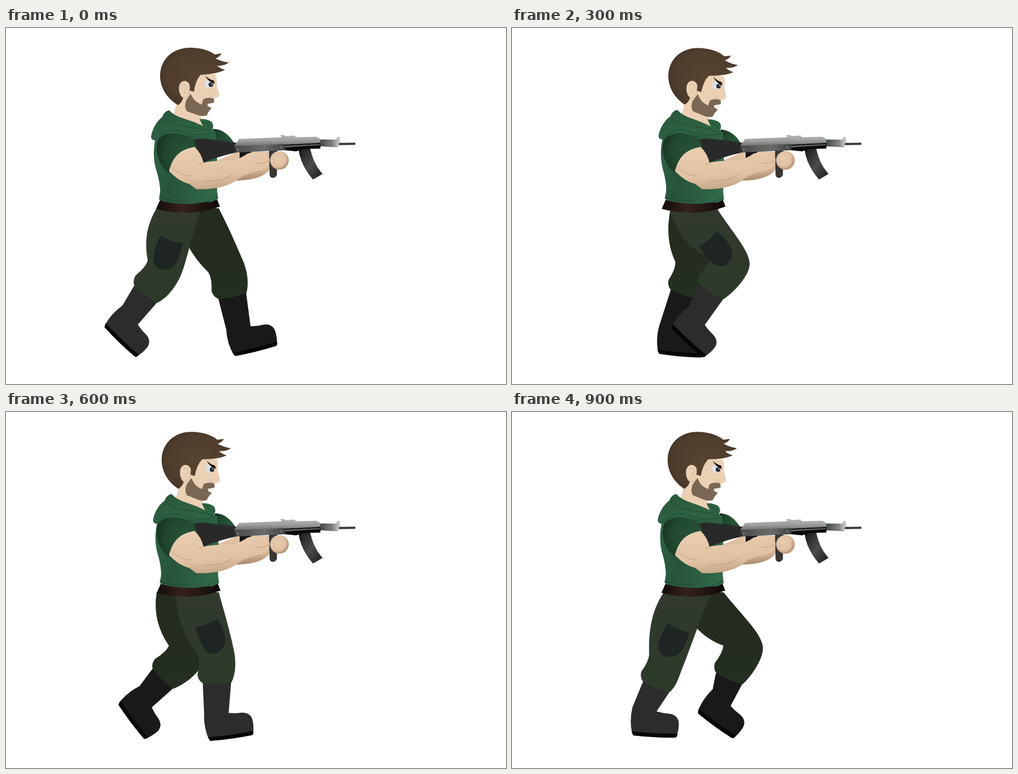
Write an HTML page that moves like this. It is 886 px wide and 632 px high and loops after 1 s.

```html
<!DOCTYPE html>
<html lang="en">
<head>
<meta charset="utf-8">
<title>Walk cycle</title>
<style>
html, body { margin: 0; height: 100%; overflow: hidden; background: #fff; }
svg { display: block; width: 886px; height: 632px; }
.line { fill: none; stroke-width: .8; }
</style>
</head>
<body>
<svg viewBox="0 0 886 632">
  <defs>
    <linearGradient id="pants" gradientUnits="userSpaceOnUse" x1="0" y1="325" x2="0" y2="490">
      <stop offset="0" stop-color="#313a2d"/><stop offset=".6" stop-color="#2f3a2b"/><stop offset="1" stop-color="#2b3b28"/>
    </linearGradient>
    <linearGradient id="farPants" gradientUnits="userSpaceOnUse" x1="0" y1="325" x2="0" y2="490">
      <stop offset="0" stop-color="#232c1f"/><stop offset=".6" stop-color="#242d20"/><stop offset="1" stop-color="#233020"/>
    </linearGradient>
    <linearGradient id="shirt" x1="0" y1=".2" x2="1" y2=".5">
      <stop offset="0" stop-color="#2f6444"/><stop offset=".4" stop-color="#27533a"/><stop offset="1" stop-color="#316848"/>
    </linearGradient>
    <linearGradient id="hood" x1="0" y1="0" x2="1" y2="1">
      <stop offset="0" stop-color="#295439"/><stop offset=".5" stop-color="#2d6041"/><stop offset="1" stop-color="#2e6644"/>
    </linearGradient>
    <radialGradient id="sleeve" cx=".75" cy=".5" r=".8">
      <stop offset="0" stop-color="#275438"/><stop offset=".65" stop-color="#20472f"/><stop offset="1" stop-color="#173222"/>
    </radialGradient>
    <linearGradient id="belt" x1="0" y1="0" x2="1" y2="0">
      <stop offset="0" stop-color="#130b0a"/><stop offset=".4" stop-color="#35221e"/><stop offset="1" stop-color="#0f0908"/>
    </linearGradient>
    <radialGradient id="hair" cx=".55" cy=".5" r=".6">
      <stop offset="0" stop-color="#56432f"/><stop offset=".7" stop-color="#503e2e"/><stop offset="1" stop-color="#453526"/>
    </radialGradient>
    <linearGradient id="arm" x1=".2" y1="0" x2=".45" y2="1">
      <stop offset="0" stop-color="#ebceb2"/><stop offset=".7" stop-color="#e0c1a3"/><stop offset="1" stop-color="#c6a687"/>
    </linearGradient>
    <linearGradient id="farArm" x1="0" y1="0" x2="0" y2="1">
      <stop offset="0" stop-color="#e2c5a9"/><stop offset=".6" stop-color="#d8b798"/><stop offset="1" stop-color="#a98a6c"/>
    </linearGradient>
    <radialGradient id="fist" cx=".4" cy=".4" r=".6">
      <stop offset="0" stop-color="#e8ccb0"/><stop offset=".7" stop-color="#dfc0a2"/><stop offset="1" stop-color="#b39475"/>
    </radialGradient>
    <linearGradient id="steel" x1="0" y1="0" x2=".05" y2="1">
      <stop offset="0" stop-color="#b3b3b3"/><stop offset=".5" stop-color="#a0a0a0"/><stop offset="1" stop-color="#707070"/>
    </linearGradient>
    <linearGradient id="guard" x1="0" y1="0" x2="1" y2="0">
      <stop offset="0" stop-color="#4a4a4a"/><stop offset=".6" stop-color="#6a6c6a"/><stop offset="1" stop-color="#3f403f"/>
    </linearGradient>
    <linearGradient id="barrel" x1="0" y1="0" x2="1" y2="0">
      <stop offset="0" stop-color="#434943"/><stop offset=".6" stop-color="#7d827d"/><stop offset="1" stop-color="#d0d2d0"/>
    </linearGradient>
    <linearGradient id="mag" x1="0" y1="0" x2="1" y2=".9">
      <stop offset="0" stop-color="#181818"/><stop offset=".55" stop-color="#4b4b4b"/><stop offset="1" stop-color="#1e1e1e"/>
    </linearGradient>
  </defs>

  <!-- far arm -->
  <path fill="url(#farArm)" d="M370 237L414 218L470 220L468 250Q455 270 408 271Z"/>

  <g id="far"></g>
  <g id="near"></g>

  <path id="waist" fill="url(#belt)" d="M273 305Q322 318 374 304L379 317Q350 328 322 328Q290 328 266 321Z"/>

  <g id="torso">
    <path fill="url(#sleeve)" d="M366 179Q389 179 404 204L372 210Z"/>
    <path fill="#ecd0b4" d="M303 130L297 153L320 172L350 175L343 150Z"/>
    <path fill="url(#shirt)" d="M266 190C259 220 262 240 268 258Q274 280 273 292L271 304Q276 308 284 309Q305 313 335 312Q352 308 364 309L376 303L374 288L375 250L371 184L340 170L290 165Z"/>
    <path fill="url(#hood)" d="M289 146Q280 148 277 158C266 166 258 182 257 194Q259 201 267 199Q280 186 300 187Q340 196 369 185Q363 180 367 177Q368 168 362 165Q352 160 343 162L349 174Q333 166 316 161Q298 156 289 146Z"/>
    <path class="line" stroke="#1b422b" d="M278 159Q290 172 318 175Q345 178 364 183M264 199Q284 176 306 183Q340 194 368 186M350 167Q360 170 364 179M273 301Q290 308 320 307M356 307L374 300"/>
  </g>

  <g id="head">
    <path fill="#ecd0b4" d="M304 100L335 80L371 81Q375 93 373 99L378 117Q379 122 369 124L368 132L362 145L340 154L304 134Z"/>
    <path fill="#7a6753" d="M327 116L330 121Q334 130 347 135L349 126Q356 121 368 124L369 131L357 134L358 138L364 141Q358 148 356 154Q347 157 338 153L321 147Q315 141 319 128Z"/>
    <path fill="#faf5f0" d="M357 134L368 132L364 140L358 138Z"/>
    <path fill="url(#hair)" d="M305 136C285 124 273 105 273 83C274 53 297 34 326 34C347 34 361 39 370 46L382 44Q378 51 371 53Q383 59 395 60Q386 67 374 66Q379 71 388 73Q374 81 345 82Q336 91 333 112L325 110Q328 97 318 93Q306 94 307 108Q308 120 314 123Q312 131 305 136Z"/>
    <path fill="#ecd0b4" stroke="#c8ab8d" stroke-width=".7" d="M325 99Q320 91 312 94Q305 99 307 111Q310 124 318 123Q325 119 325 111Z"/>
    <path class="line" stroke="#c9a98b" d="M312 100Q321 96 321 107Q315 108 317 115M363 115L361 121L366 122"/>
    <ellipse cx="358.500" cy="98.500" rx="6.500" ry="7" fill="#dce1e7"/>
    <circle cx="363" cy="99.500" r="4" fill="#272a30"/>
    <circle cx="364.500" cy="98" r="1" fill="#dce1e7"/>
    <path fill="#17120f" d="M353 84Q361 91 368 92L370 98Q359 95 353 84Z"/>
  </g>

  <g id="gun">
    <path fill="#292929" d="M333 198Q344 195 364 198L411 204L408 221Q376 228 350 239Q337 221 333 198Z"/>
    <path fill="#151515" d="M414 217L438 217L430 226Q419 227 414 231Z"/>
    <path fill="#373737" d="M466 216L481 216L480 261Q478 266 472 266Q467 265 467 259Z"/>
    <path fill="url(#mag)" d="M518 214L539 214Q545 242 561 259L544 269Q522 244 518 214Z"/>
    <path fill="#090909" d="M494 206L558 201L557 214L526 215L514 219L494 217Z"/>
    <path fill="#666" d="M494 209L556 206L556 208L494 212Z"/>
    <path fill="url(#steel)" d="M404 210L413 197L488 194L486 190L492 190L496 192L511 191L514 194L550 193L557 197V204L496 207Z"/>
    <path fill="url(#guard)" d="M404 209L495 206L495 217L408 221Z"/>
    <circle cx="411" cy="216" r="2" fill="#777"/>
    <circle cx="488" cy="212" r="2" fill="#777"/>
    <path fill="url(#barrel)" d="M557 198L585 198L587 194L592 193V205L588 212L557 210Z"/>
    <path fill="#3a3c40" d="M590 204L619 203.500V207.500L590 208Z"/>
  </g>

  <circle cx="484.500" cy="235" r="16.500" fill="url(#fist)"/>

  <!-- near arm -->
  <path fill="url(#arm)" d="M334 211C312 215 296 224 288 253Q305 272 325 277L337 286Q380 288 406 272Q422 258 455 252Q468 245 467 233Q462 223 450 220Q430 218 417 231L404 235Q370 235 350 239Q346 222 334 211Z"/>
  <path class="line" stroke="#b4926f" d="M291 246Q308 262 328 263M348 272Q385 274 404 258M350 239L342 242M443 240Q458 242 466 235"/>
  <path fill="url(#sleeve)" d="M334 211C312 215 296 224 288 257C270 242 262 217 270 198Q279 186 301 187Q324 191 334 200Z"/>
</svg>

<script>
const $ = id => document.getElementById(id);
const STEPS = 10, HIP = 322;

// Stride: phase, knee x y, ankle x y, foot angle; the leg swings first, then stands
const stride = [
  [0, 277, 432, 215, 520, 43],
  [1, 312, 437, 241, 515, 52],
  [3, 379, 425, 323, 521, 42],
  [4, 404, 427, 368, 518, 35],
  [5, 390, 427, 418, 542, -15],
  [6, 372, 431, 378, 545, -9],
  [8, 320, 425, 285, 544, 4],
  [9, 273, 441, 238, 539, 2]
];

function pose(phase) {
  const a = stride.findLast(k => k[0] <= phase), b = stride.find(k => k[0] >= phase);
  const t = a === b ? 0 : (phase - a[0]) / (b[0] - a[0]);
  return a.map((v, i) => v + (b[i] - v) * t);
}

// Rotates and moves every "x y" pair of a path
function place(path, x, y, deg) {
  const a = deg * Math.PI / 180, c = Math.cos(a), s = Math.sin(a);
  return path.replace(/(-?[\d.]+) (-?[\d.]+)/g, (_, u, v) =>
    `${(x + u * c - v * s).toFixed(1)} ${(y + u * s + v * c).toFixed(1)}`);
}

// Angle of a limb away from hanging straight down
const tilt = (x1, y1, x2, y2) => Math.atan2(x1 - x2, y2 - y1) * 180 / Math.PI;

function leg(phase, boot, cloth, patch) {
  const [, kx, ky, ax, ay, footTilt] = pose(phase);
  const hip = HIP + 20 * Math.cos((phase - 5.6) / STEPS * 2 * Math.PI);
  const left = Math.max(267, hip - 42), right = Math.min(377, hip + 42);
  const shinTilt = tilt(kx, ky, ax, ay) + 1;
  const thighTilt = 1.35 * tilt(hip, HIP, kx, ky);
  const bend = Math.max(0, shinTilt - thighTilt);

  const shin = path => place(path, kx, ky, shinTilt);
  const foot = path => place(path, ax, ay, footTilt);
  const [capX, capY] = shin(`32 ${-.4 * bend}`).split(" ").map(Number);
  const cap = path => place(path, capX, capY, (shinTilt + thighTilt) / 2);
  const draw = (fill, d) => `<path fill="${fill}" d="${d}"/>`;

  const shaft = shin("M-25 45L25 45L25 52L") +
    foot("18 -8Q30 -5 40 -5C53 -4 59 4 58 16Q58 26 55 34L-24 33Q-30 10 -25 -14L") + shin("-25 52Z");
  const sole = foot("M-25 29Q20 32 56 30Q57 38 50 37.5Q15 39 -22 36Z");
  const trouser = `M${left} 320Q${(left + kx - 30) / 2 - 16} ${368 + .25 * (kx - 300)} ` +
    shin("-32 0Q-28 12 -34 34Q-33 44 -26 49Q0 55 26 50C34 34 ") + cap("0 22 0 0C0 -24 ") +
    `${(right + capX) / 2} ${(320 + capY) / 2 - 4} ${right} 320Z`;
  const pocket = place("M-20 -25Q2 -21 22 -25C26 5 25 29 -2 31C-22 30 -23 5 -20 -25Z",
    hip + .72 * (kx - hip), HIP + .7 * (ky - HIP), thighTilt);

  return draw(boot, shaft) + draw("#060606", sole) + draw(cloth, trouser) +
    (patch ? draw("#1f2522", pocket) : "");
}

let shown = -1;
function frame(now) {
  const step = Math.floor(now / 1000 * STEPS) % STEPS;
  if (step !== shown) {
    shown = step;
    const half = step % 5 / 5;
    const sway = Math.sin(Math.PI * half) ** .8;
    const shift = `translate(${1.2 * Math.sin(2 * Math.PI * half)} 0)`;
    $("far").innerHTML = leg((step + STEPS / 2) % STEPS, "#1a1819", "url(#farPants)", false);
    $("near").innerHTML = leg(step, "#2c2c2c", "url(#pants)", true);
    $("waist").setAttribute("transform", shift);
    $("torso").setAttribute("transform", `${shift} rotate(${1.6 * sway} ${HIP} 318)`);
    $("head").setAttribute("transform", `translate(0 1) rotate(${3.6 * sway} 320 150)`);
  }
  requestAnimationFrame(frame);
}
frame(0);
</script>
</body>
</html>
```
